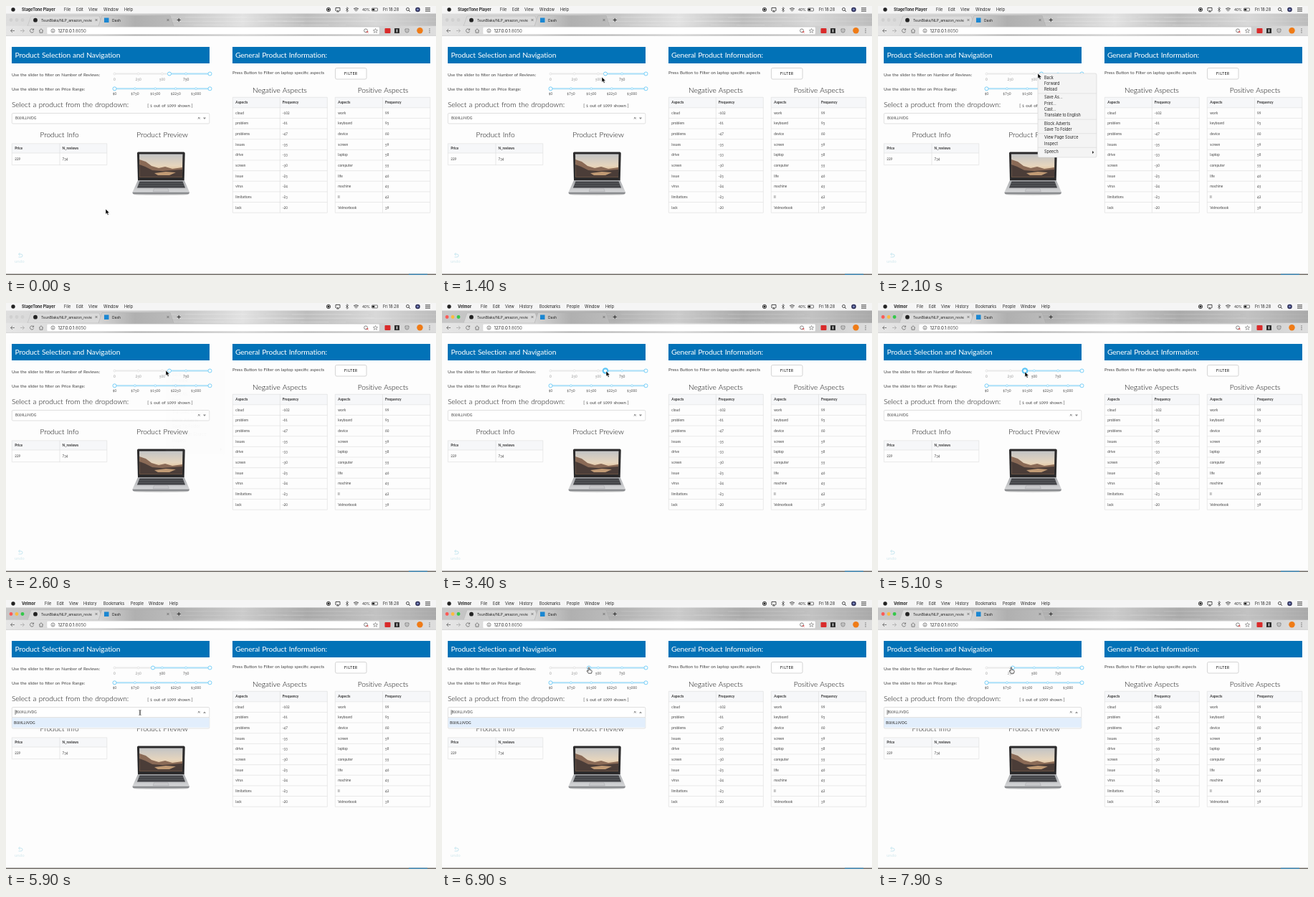
An HTML page that plays this animation: 600 px wide and 375 px high, repeating every 8000 ms.

```html
<!DOCTYPE html>
<html lang="en">
<head>
<meta charset="utf-8">
<title>Product dashboard</title>
<style>
html, body { margin: 0; width: 100%; height: 100%; overflow: hidden; background: #fdfdfd; }
svg { display: block; width: 100vw; height: 100vh; }
text { font-family: Lato, "Open Sans", sans-serif; fill: #444; font-feature-settings: "onum"; word-spacing: .06em; white-space: pre; }
.bar { font: 10.3px Lato, sans-serif; fill: #fff; letter-spacing: -.17px; }
.head { font-size: 10.2px; font-weight: 300; fill: #111; letter-spacing: -.05px; }
.body { font-size: 6.05px; }
.cell { font-size: 4.9px; }
.bold { font-size: 4.85px; font-weight: 700; fill: #333; }
.tick { font-size: 5.2px; text-anchor: middle; }
.ui { font: 5.5px Inter, sans-serif; fill: #222; word-spacing: 0; font-feature-settings: normal; }
.app { font-weight: 700; }
.mid { text-anchor: middle; }
.icon { fill: none; stroke: #666; stroke-width: .8; }
</style>
</head>
<body>
<svg id="stage" viewBox="0 0 600 375" preserveAspectRatio="none">
  <defs>
    <linearGradient id="strip">
      <stop offset="0" stop-color="#dedede"/><stop offset=".22" stop-color="#cfcfcf"/>
      <stop offset=".4" stop-color="#c4c4c4"/><stop offset=".55" stop-color="#e2e2e2"/>
      <stop offset=".7" stop-color="#bdbdbd"/><stop offset=".86" stop-color="#d8d8d8"/>
      <stop offset="1" stop-color="#bcbcbc"/>
    </linearGradient>
    <linearGradient id="metal" gradientUnits="userSpaceOnUse" x2="600">
      <stop offset="0" stop-color="#e6e6e6"/><stop offset=".22" stop-color="#d2d2d2"/>
      <stop offset=".3" stop-color="#b0b0b0"/><stop offset=".4" stop-color="#bcbcbc"/>
      <stop offset=".55" stop-color="#dcdcdc"/><stop offset=".7" stop-color="#bababa"/>
      <stop offset="1" stop-color="#dedede"/>
    </linearGradient>
    <linearGradient id="sky" x2="0" y2="1">
      <stop offset="0" stop-color="#c3c4c5"/><stop offset=".5" stop-color="#e6d5bd"/>
      <stop offset="1" stop-color="#e0a868"/>
    </linearGradient>
    <linearGradient id="silver" x2="0" y2="1">
      <stop offset="0" stop-color="#a5a7aa"/><stop offset="1" stop-color="#d6d7d9"/>
    </linearGradient>
  </defs>

  <g id="desktop">
    <rect width="600" height="375" fill="#fdfdfd"/>
    <rect y="373.4" width="600" height="1.6" fill="#77736e"/>
    <rect x="562" y="373.4" width="26" height="1.6" fill="#4f93bd"/>
    <rect width="600" height="10.5" fill="#f5f5f5"/>
    <circle cx="10" cy="5" r="2.7" fill="#222"/>
  </g>

  <g id="status">
    <g class="icon" style="stroke:#222">
      <circle cx="450" cy="5" r="2.7"/><rect x="449" y="4" width="2" height="2" fill="#222"/>
      <path d="M461 6.5h-1v-4h6v4h-1M461.5 8l1.5-2 1.5 2z"/>
      <path d="M474.3 3.2l3.4 3.4-1.7 1.7V1.7l1.7 1.7-3.4 3.4" stroke-width=".6"/>
      <path d="M485 4q3.5-3 7 0M486.2 5.4q2.3-1.9 4.6 0M487.4 6.9q1.1-.9 2.2 0"/>
      <rect x="510.5" y="3" width="8" height="4" rx=".8" stroke-width=".6"/>
      <rect x="511.2" y="3.7" width="3" height="2.6" fill="#222" stroke="none"/>
      <circle cx="560.5" cy="4.5" r="2"/><path d="M562 6l2 2M585 2.8h7M585 5h7M585 7.2h7"/>
    </g>
    <circle cx="574.5" cy="5" r="3.3" fill="#33345c"/><circle cx="574.5" cy="5" r="1.4" fill="#7f8fc9"/>
  </g>

  <g id="browser">
    <rect y="10.5" width="600" height="17.5" fill="url(#strip)"/>
    <g id="grain" stroke="#fff" stroke-width=".5"></g>
    <rect id="shade" y="10.5" width="600" height="17.5" fill="#000" opacity=".1"/>
    <g id="lights"><circle cx="7" cy="19.5" r="2.4"/><circle cx="15" cy="19.5" r="2.4"/><circle cx="23" cy="19.5" r="2.4"/></g>
    <path d="M30 28l5-14h95l5 14z" fill="#dadada" stroke="#b4b4b4" stroke-width=".5"/>
    <rect y="27.8" width="600" height="13.5" fill="url(#metal)"/>
    <path d="M129 28l5-14.5h95l5 14.5z" fill="url(#metal)"/>
    <path d="M129 28l5-14.5h95l5 14.5" fill="none" stroke="#a8a8a8" stroke-width=".5"/>
    <path d="M238.7 19.5h5M241.2 17v5" stroke="#222" stroke-width=".9"/>
    <circle cx="41" cy="19.7" r="2.9" fill="#222"/>
    <rect x="137" y="16.500" width="6.500" height="6.500" fill="#1b87d2"/>
    <path class="icon" d="M124.500 18l3 3m0-3l-3 3M224.500 18l3 3m0-3l-3 3"/>
    <rect x="57" y="29.300" width="464" height="10.200" rx="1.500" fill="#fff" stroke="#d4d4d4" stroke-width=".5"/>
    <path d="M0 41.400h600" stroke="#bdbdbd" stroke-width=".6"/>
    <g class="icon">
      <path d="M12 34.500H6.500m2.500-2.500l-2.500 2.500 2.500 2.500"/>
      <path d="M20 34.500h5.500m-2.500-2.500l2.500 2.500-2.500 2.500" style="stroke:#aaa"/>
      <path d="M38.300 33a2.600 2.600 0 1 0 .3 2.300M38.600 31.500v2h-2"/>
      <path d="M46 34.500l3-2.700 3 2.700M47 34v3.200h4V34"/>
      <circle cx="65.500" cy="34.500" r="2.500"/><path d="M65.500 34v2M65.500 32.700v.6"/>
      <circle cx="502" cy="34.300" r="2.400"/><path d="M503 35l2.500 2.500m0-2.500l-2.500 2.500" style="stroke:#d33"/>
      <path d="M515.500 31.500l.9 2 2.200.2-1.700 1.400.6 2.200-2-1.200-2 1.200.6-2.200-1.700-1.400 2.200-.2z" stroke-width=".6"/>
      <path d="M557 32h5v2.500a2.500 2.500 0 0 1-5 0zM558.300 34l1.200 1.100 1.200-1.100" stroke-width=".7"/>
    </g>
    <rect x="528.500" y="31" width="8" height="7" rx="1" fill="#d92b2b"/>
    <rect x="542" y="31" width="7" height="7" rx=".5" fill="#333"/>
    <rect x="545" y="32.500" width="1" height="4" fill="#fff"/>
    <circle cx="577.500" cy="34.300" r="4.200" fill="#ef7b16"/>
    <g fill="#666"><circle cx="591" cy="32" r=".7"/><circle cx="591" cy="34.500" r=".7"/><circle cx="591" cy="37" r=".7"/></g>
  </g>

  <g id="page">
    <path d="M8 57h276v23H8zM316 57h276v23H316z" fill="#0272b7"/>
    <rect x="459.500" y="86.500" width="43.500" height="15.500" rx="2" fill="#fff" stroke="#bbb" stroke-width=".6"/>
    <rect x="8.300" y="149.500" width="275.500" height="14.500" rx="1.500" fill="#fff" stroke="#ccc" stroke-width=".6"/>
    <path class="icon" d="M268 155l2.600 2.600m0-2.600l-2.600 2.600" stroke-width=".6"/>
    <path d="M18 346h3a2 2 0 0 1 0 4h-3.500M19.500 344l-2 2 2 2" fill="none" stroke="#bfe3ee" stroke-width=".9"/>
  </g>

  <g id="laptop">
    <ellipse cx="216.500" cy="263" rx="37" ry="1.200" fill="#ddd"/>
    <path d="M184.500 203.500h63.500q1.700 0 1.700 2l-1 37.500h-64.700l-1-37.500q0-2 1.500-2z" fill="#2b2a2b"/>
    <path d="M186 206.500h60.500l-.6 32h-59.400z" fill="url(#sky)"/>
    <path d="M186.100 214l9 3 8 6 10 3 9-2 10 3 14-2-.5 13.500h-59.100z" fill="#8a6a56"/>
    <path d="M186.200 221l8 3 10 5 14 1 28-2-.3 10.500h-59.400z" fill="#4b3d38"/>
    <path d="M207 233l16-2 14 1-9 4h-16z" fill="#c09a74"/>
    <path d="M184 243h64.700l7.300 16.500h-79.500z" fill="url(#silver)"/>
    <path d="M186.500 244.500h60l3.600 9h-67.200z" fill="#424347"/>
    <path d="M185.500 247.300h62M184.300 250.300h64.500" stroke="#7c7e82" stroke-width=".4"/>
    <path d="M206.500 254.800h19.500l1.300 3.900h-22z" fill="#c8c9cb" stroke="#999ba0" stroke-width=".4"/>
    <path d="M176.500 259.500h79.500q0 2.800-2.500 3h-74.500q-2.500-.2-2.500-3z" fill="#8b8d90"/>
  </g>

  <g id="sliders"></g>
  <g id="labels"></g>

  <g id="menu">
    <path d="M8.300 164h275.500v13.500q0 1.500-1.500 1.500H9.800q-1.500 0-1.500-1.500z" fill="#fff" stroke="#ccc" stroke-width=".6"/>
    <rect x="8.600" y="164.300" width="275" height="13.400" fill="#e2eefc"/>
    <path d="M13 153.200v6.800" stroke="#222" stroke-width=".6"/>
  </g>
  <path id="arrow" fill="#888"/>
  <g id="context">
    <rect x="223" y="94" width="82" height="117" rx="2" fill="#f4f4f4" stroke="#c8c8c8" stroke-width=".5"/>
    <path d="M299 202l2.400 2-2.400 2z" fill="#333"/>
  </g>
  <g id="cursor">
    <path id="point" d="M0 0v7.200l1.700-1.500 1.200 2.700 1.300-.6-1.200-2.600h2.300z" fill="#000" stroke="#fff" stroke-width=".5"/>
    <path id="beam" d="M-1.500-3.500q1.500 0 1.500 1v5q0 1-1.500 1M1.500-3.500q-1.500 0-1.500 1v5q0 1 1.500 1" fill="none" stroke="#222" stroke-width=".7"/>
    <path id="hand" d="M-.9-2.500q.9-1.200 1.700 0V.3l2.600.7q1 .4.800 1.500l-.7 2.700H-.6L-2.900 2q.3-1 1.300-.4l.7.700z" fill="#fff" stroke="#111" stroke-width=".7"/>
  </g>
</svg>

<script>
const $ = id => document.getElementById(id);
const page = $('page'), labels = $('labels'), sliders = $('sliders');

function add(parent, tag, attrs, content) {
  const el = document.createElementNS('http://www.w3.org/2000/svg', tag);
  for (const key in attrs) el.setAttribute(key, attrs[key]);
  if (content !== undefined) el.textContent = content;
  parent.appendChild(el);
  return el;
}
const write = (parent, cls, x, y, s) => add(parent, 'text', { class: cls, x, y }, s);
const rect = (parent, x, y, width, height, fill) => add(parent, 'rect', { x, y, width, height, fill });

// brushed metal streaks
for (let i = 0; i < 24; i++) {
  const x = (i * 137) % 560, y = 11 + (i * 5.3) % 16;
  add($('grain'), 'path', { d: `M${x} ${y}h${60 + (i * 41) % 120}`, opacity: .12 + (i % 4) * .06 });
}

// menu bar
function menuBar(app, items) {
  const g = add($('stage'), 'g', {});
  write(g, 'ui app', 22, 7, app);
  items.forEach(([x, s]) => write(g, 'ui', x, 7, s));
  $('stage').insertBefore(g, $('browser'));
  return g;
}
const playerBar = menuBar('StageTone Player',
  [[81, 'File'], [98, 'Edit'], [115, 'View'], [136, 'Window'], [165, 'Help']]);
const browserBar = menuBar('Velmor',
  [[54, 'File'], [71, 'Edit'], [88, 'View'], [108, 'History'], [136, 'Bookmarks'],
   [174, 'People'], [199, 'Window'], [228, 'Help']]);
write($('status'), 'ui', 497, 7, '40%').style.fontSize = '4.8px';
write($('status'), 'ui', 526, 7, 'Fri 18:28');
write($('browser'), 'ui', 49, 21.6, 'TeunBlaks/NLP_amazon_revie').style.fontSize = '5px';
write($('browser'), 'ui', 148, 21.6, 'Dash').style.fontSize = '5px';
const url = write($('browser'), 'ui', 72.5, 36.5, '127.0.0.1');
url.style.fontSize = '6px';
add(url, 'tspan', { fill: '#555' }, ':8050');

// page text
write(page, 'bar', 12.5, 71.8, 'Product Selection and Navigation');
write(page, 'bar', 320, 71.8, 'General Product Information:');
write(page, 'body', 8, 98.4, 'Use the slider to filter on Number of Reviews:');
write(page, 'body', 8, 118, 'Use the slider to filter on Price Range:');
write(page, 'body', 316, 95, 'Press Button to Filter on laptop specific aspects');
write(page, 'head', 8, 141, 'Select a product from the dropdown:');
write(page, 'body mid', 229, 141.2, '[ 1 out of 1099 shown ]');
[[74.5, 183.2, 'Product Info'], [218, 183.2, 'Product Preview'],
 [382, 121.2, 'Negative Aspects'], [526, 121.2, 'Positive Aspects']]
  .forEach(([x, y, s]) => write(page, 'head mid', x, y, s));
write(page, 'bold', 472, 96, 'FILTER').style.cssText = 'font-size:4.6px;letter-spacing:.75px';
write(page, 'body', 12, 358.3, 'undo').style.fill = '#d2e8ee';
const code = write(page, 'cell', 13, 158.4, 'B009LL9VDG');
write($('menu'), 'cell', 11, 172.7, 'B009LL9VDG').style.fontWeight = 600;

// context menu, grouped by separators
let rowY = 101.5;
[['Back', 'Forward', 'Reload'], ['Save As…', 'Print…', 'Cast…', 'Translate to English'],
 ['Block Adverts', 'Save To Folder'], ['View Page Source', 'Inspect'], ['Speech']].forEach((group, i) => {
  if (i) add($('context'), 'path', { d: `M223 ${rowY - 7.5}h82`, stroke: '#d6d6d6', 'stroke-width': .6 });
  group.forEach(s => { write($('context'), 'ui', 232, rowY, s); rowY += 8.3; });
  rowY += 3;
});

// tables
function table(x, y, w, split, headH, rowH, heads, rows) {
  const h = headH + rowH * rows.length;
  rect(page, x, y, w, headH, '#f6f7f9');
  let d = `M${x} ${y}h${w}v${h}h${-w}zM${split} ${y}v${h}`;
  [[heads[0], x + 4], [heads[1], split + 3.5]].forEach(([s, tx]) => write(page, 'bold', tx, y + headH / 2 + 1.5, s));
  rows.forEach((row, i) => {
    const top = y + headH + rowH * i;
    d += `M${x} ${top}h${w}`;
    write(page, 'cell', x + 4, top + rowH / 2 + 1.7, row[0]);
    write(page, 'cell', split + 3.5, top + rowH / 2 + 1.7, row[1]);
  });
  add(page, 'path', { d, fill: 'none', stroke: '#dcdcdc', 'stroke-width': .6 });
}
const pairs = s => s.split(', ').map(p => p.split(' '));
table(8.3, 191.8, 132.5, 75, 13.2, 16.6, ['Price', 'N_reviews'], [['229', '734']]);
table(316.3, 127.3, 132, 382.3, 14.5, 14.64, ['Aspects', 'Frequency'], pairs(
  'cloud -102, problem -61, problems -47, issues -35, drive -33, screen -30, issue -25, virus -24, limitations -23, lack -20'));
table(459.3, 127.3, 132.5, 525.5, 14.5, 14.64, ['Aspects', 'Frequency'], pairs(
  'work 99, keyboard 95, device 60, screen 59, laptop 58, computer 55, life 46, machine 45, ll 42, Velmorbook 39'));

// sliders
const dot = (x, y, r, stroke) =>
  add(sliders, 'circle', { cx: x, cy: y, r, fill: '#fff', stroke, 'stroke-width': 1 });
function slider(y, ticks, step, from) {
  rect(sliders, 151, y - 1, 134, 2, '#e9e9e9');
  const track = rect(sliders, from, y - 1, 284.5 - from, 2, '#abe2fb');
  const marks = ticks.map((s, i) => {
    const x = 151.5 + i * step;
    return { x, dot: dot(x, y, 1.4, '#96dbfa'), text: write(labels, 'tick', x, y + 9, s) };
  });
  const halo = add(sliders, 'circle', { cx: from, cy: y, r: 4.3, fill: '#57c5f7' });
  const knob = dot(from, y, 2.5, '#74cef8');
  dot(284.5, y, 2.5, '#74cef8');
  return (x, focus) => {
    track.setAttribute('x', x);
    track.setAttribute('width', 284.5 - x);
    knob.setAttribute('cx', x);
    halo.setAttribute('cx', x);
    halo.style.display = focus ? '' : 'none';
    marks.forEach(m => {
      const on = m.x >= x - .5;
      m.dot.setAttribute('stroke', on ? '#96dbfa' : '#e3e3e3');
      m.text.style.fill = on ? '#555' : '#999';
    });
  };
}
const setReviews = slider(94.5, ['0', '250', '500', '750'], 33.2, 228);
slider(115.3, ['$0', '$750', '$1500', '$2250', '$3000'], 28.4, 151.5)(151.5, false);

// motion: [ms, x, y]
const path = [[0, 139, 283], [100, 139, 283], [400, 171, 240], [500, 171, 240], [1400, 223, 99],
  [1800, 223, 94], [2800, 223, 94], [3200, 229, 95], [3700, 229, 95], [4200, 214, 96],
  [4600, 205, 96], [5300, 205, 96], [5800, 187, 157], [6200, 187, 157], [6900, 205, 97],
  [7100, 205, 97], [7600, 186, 97], [8000, 186, 97]];
const knobPath = [[0, 228], [4300, 228], [4600, 205], [7100, 205], [7600, 188], [8000, 188]];
const fade = [[0, 0], [1900, 0], [2000, 1], [2300, 1], [2700, 0], [8000, 0]];

function at(keys, t, n) {
  const i = Math.max(1, keys.findIndex(k => k[0] > t));
  const a = keys[i - 1], b = keys[i], p = (t - a[0]) / (b[0] - a[0]);
  return a[n] + (b[n] - a[n]) * p * p * (3 - 2 * p);
}
const show = (el, on) => { el.style.display = on ? '' : 'none'; };
const lights = [...$('lights').children], colors = ['#fc5b57', '#fdbc40', '#34c84a'];

function draw() {
  const t = Math.floor(performance.now() % 8000 / 100) * 100;
  const active = t >= 2900, open = t >= 5900;
  show(playerBar, !active);
  show(browserBar, active);
  show($('shade'), active);
  lights.forEach((c, i) => c.setAttribute('fill', active ? colors[i] : '#d0d0d0'));
  setReviews(at(knobPath, t, 1), t >= 3200 && t < 5400);
  $('context').setAttribute('opacity', at(fade, t, 1) ** 2);

  show($('menu'), open);
  $('arrow').setAttribute('d', open ? 'M275 157.700h4l-2-2.300z' : 'M275 155.600h4l-2 2.300z');
  code.setAttribute('x', open ? 13.4 : 13);

  const y = at(path, t, 2);
  const beam = t > 5000 && y > 149, hand = t > 6200 && !beam;
  show($('beam'), beam);
  show($('hand'), hand);
  show($('point'), !beam && !hand);
  $('cursor').setAttribute('transform', `translate(${at(path, t, 1)} ${y})`);
  requestAnimationFrame(draw);
}
draw();
</script>
</body>
</html>
```
